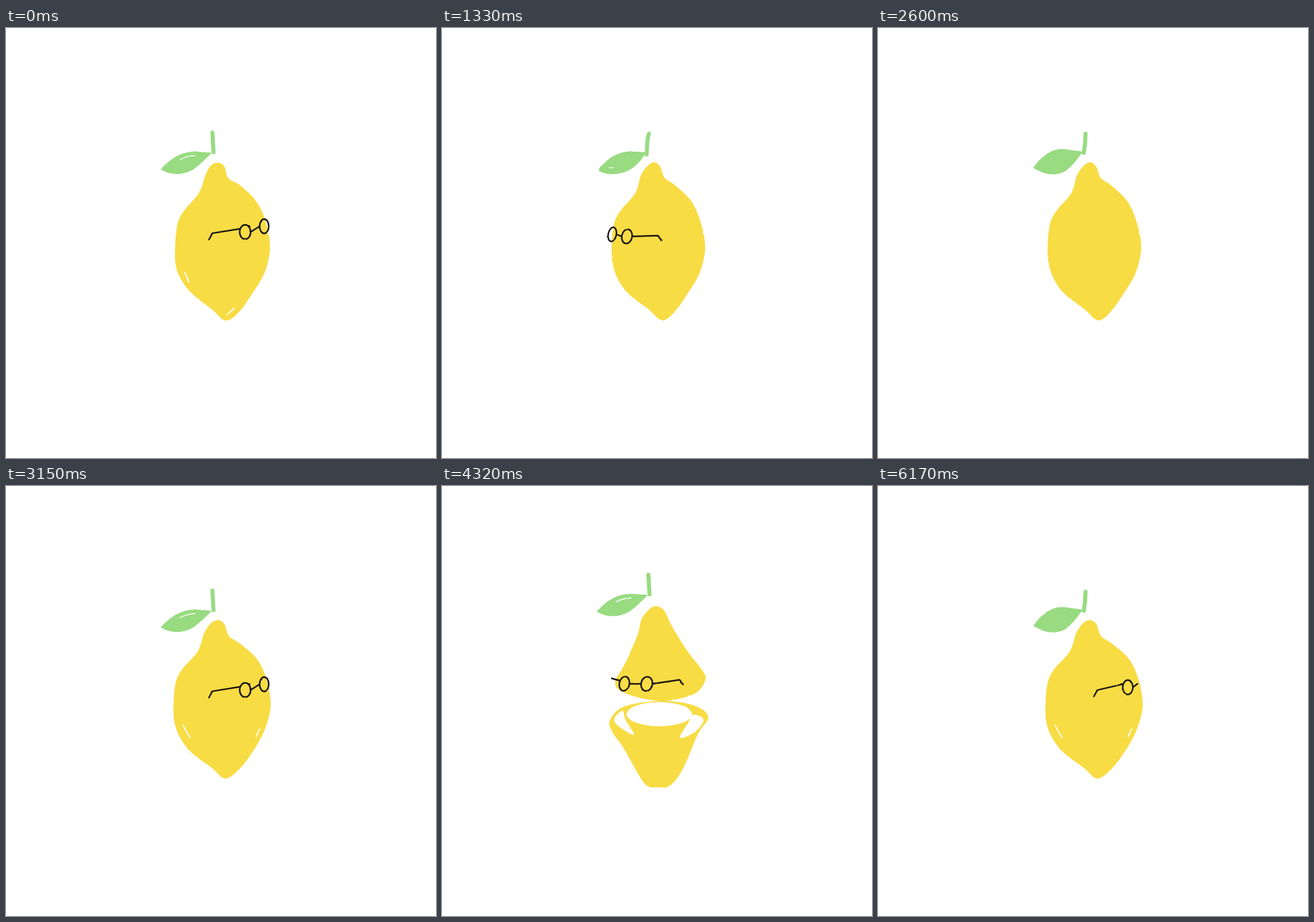
Write an HTML page that moves like this. It is 748x748 px and loops after 6240 ms.

```html
<!DOCTYPE html>
<html lang="en">
<head>
<meta charset="utf-8">
<title>Lemon with glasses</title>
<style>
html, body { margin: 0; width: 100%; height: 100%; overflow: hidden; background: #fff; }
svg { display: block; width: 100%; height: 100%; }
.yellow { fill: #f8dc44; }
.white { fill: #fff; }
.line { fill: none; stroke-linecap: round; stroke-linejoin: round; }
</style>
</head>
<body>
<svg viewBox="0 0 748 748">
  <defs>
    <filter id="rough" filterUnits="userSpaceOnUse" x="0" y="0" width="748" height="748" color-interpolation-filters="sRGB">
      <feTurbulence type="fractalNoise" baseFrequency=".15" numOctaves="2" seed="4" result="noise"/>
      <feDisplacementMap in="SourceGraphic" in2="noise" scale="2" xChannelSelector="R" yChannelSelector="G"/>
    </filter>
  </defs>
  <g filter="url(#rough)">
    <path id="ring" class="line" stroke="#f8dc44" stroke-width="3.5"/>
    <g id="closed">
      <path id="lemon" class="yellow"/>
      <path id="scratch" class="line" stroke="#fff" stroke-width="2"/>
    </g>
    <g id="cup">
      <path id="shell" class="yellow"/>
      <path id="leftHole" class="white"/>
      <path id="rightHole" class="white"/>
      <ellipse class="white" cx="378" cy="397" rx="57" ry="21"/>
    </g>
    <path id="head" class="yellow"/>
    <g id="leaf">
      <path id="blade" fill="#98db81"/>
      <path id="stem" class="line" stroke="#98db81" stroke-width="7"/>
      <path id="nick" class="line" stroke="#fff" stroke-width="1.7"/>
    </g>
    <path id="glasses" class="line" stroke="#1b1710" stroke-width="2.7"/>
  </g>
</svg>
<script>
const LOOP = 6240, TICK = 130, TURN_TICKS = 24;
const OFFSET_AT = 550, OPEN_AT = 3540, CLOSE_AT = 5130;

const part = id => document.getElementById(id);
const set = (id, d) => part(id).setAttribute('d', d);
const move = (id, transform) => part(id).setAttribute('transform', transform);
const show = (id, on) => part(id).setAttribute('display', on ? 'inline' : 'none');
const parse = text => text.split(' ').map(p => p.split(',').map(Number));
const lerp = (a, b, k) => a + (b - a) * k;
const rad = deg => deg * Math.PI / 180;
const stepped = (t, delay) => Math.floor((t - delay) / TICK) * TICK;

// Closed Catmull-Rom curve through the points
function smooth(pts) {
  const at = i => pts[(i + pts.length) % pts.length];
  let d = 'M' + pts[0];
  pts.forEach((b, i) => {
    const [a, c, e] = [at(i - 1), at(i + 1), at(i + 2)];
    const c1 = b.map((v, j) => v + (c[j] - a[j]) / 6);
    const c2 = c.map((v, j) => v - (e[j] - b[j]) / 6);
    d += `C${c1} ${c2} ${c}`;
  });
  return d + 'Z';
}

function random(seed) {
  return () => (seed = seed * 16807 % 2147483647) / 2147483647;
}

// Each redrawing is a little wider, with a slightly unsteady hand
const lemonKeys = parse('371,234 380,242 387,261 406,274 433,299 450,332 458,380 449,425 427,463 404,495 382,508 358,490 320,458 298,420 294,375 302,330 335,288 346,257 357,239');
const lemons = [0, 1, 2].map(i => {
  const next = random(71 + i * 900);
  const shake = () => next() * 2 - 1;
  const width = .985 + .02 * i;
  return smooth(lemonKeys.map(([x, y]) => [376 + (x - 376) * width + shake(), y + shake()]));
});
const scratches = ['', 'M311 425L318 442M384 499L397 487', 'M308 416L320 438M435 436L441 423'];

const leaves = [
  ['M269 246Q297 214 330 215L358 217Q342 234 326 246Q297 262 269 246Z', 'M359 182L361 216', 'M303 229Q315 222 329 222'],
  ['M273 245Q300 212 333 215L355 216Q342 240 320 250Q294 259 273 249Z', 'M360 184Q357 190 356 220', 'M291 243L297 243'],
  ['M270 243Q296 207 326 211L356 215Q341 238 326 249Q300 263 270 243Z', 'M361 184Q361 200 358 217', '']
];

set('head', smooth(parse('367,210 385,215 400,244 426,286 453,321 458,338 438,362 382,374 322,362 301,343 318,310 340,260 348,230')));
set('shell', smooth(parse('292,408 316,384 378,374 436,381 463,401 445,432 420,490 398,520 374,524 352,517 316,456 297,429')));
set('leftHole', smooth(parse('300,404 314,391 319,406 334,433 306,417')));
set('rightHole', smooth(parse('438,398 455,407 440,428 414,438 428,412')));

// Quick rise and slow return while the lemon is open
function liftAt(t) {
  const u = (t - 3445) / 1625;
  return u > 0 && u < 1 ? 31 * Math.sin(Math.PI * u ** .65) : 0;
}
const headLiftAt = t => liftAt(t - 100);

// Facing angle by tick; the back is passed faster than the front
const turn = parse('0,42 4,16 9,-29 10,-55 15,-92 23,-303 24,-318');
const EDGE_LEFT = -72, EDGE_RIGHT = 60;

function facing(tick) {
  const n = tick % TURN_TICKS;
  const i = turn.findIndex(key => key[0] > n);
  const [[n0, a0], [n1, a1]] = [turn[i - 1], turn[i]];
  const angle = lerp(a0, a1, (n - n0) / (n1 - n0));
  return angle < -180 ? angle + 360 : angle;
}

const orbitX = a => 377 + 86 * Math.sin(rad(a));
const orbitY = a => a < -25 ? 363 - .002 * (a + 25) ** 2 : 342 + 21 * Math.cos(rad(a + 25));
const clip = a => Math.min(EDGE_RIGHT, Math.max(EDGE_LEFT, a));

function drawGlasses(tick) {
  const face = facing(tick);
  let d = '';
  const line = pts => d += 'M' + pts.join('L');
  const lenses = [-15, 15].map(off => {
    const a = face + off;
    return { a, x: orbitX(a), y: orbitY(a), rx: 5.5 + 4.5 * Math.cos(rad(a)), shown: a > -74 && a < 66 };
  });

  for (const { a, x, y, rx, shown } of lenses) {
    if (!shown) continue;
    const tilt = a < -5 ? 12 : 0;
    const dx = 12.5 * Math.sin(rad(tilt)), dy = 12.5 * Math.cos(rad(tilt));
    const top = [x + dx, y - dy], bottom = [x - dx, y + dy];
    d += `M${top}A${rx} 12.5 ${tilt} 0 1 ${bottom}A${rx} 12.5 ${tilt} 0 1 ${top}`;
  }

  const joint = (lens, side) => lens.shown
    ? [lens.x + side * lens.rx, lens.y]
    : [orbitX(clip(lens.a)), orbitY(clip(lens.a))];
  const [left, right] = lenses;
  if (left.shown || right.shown) line([joint(left, 1), joint(right, -1)]);

  for (const side of [-1, 1]) {
    const lens = side < 0 ? left : right;
    const raise = side < 0 ? 5.5 : 0;
    const bend = face + side * 54;
    const to = clip(bend);
    const [x, y] = joint(lens, side);
    const end = [orbitX(to), orbitY(to) - raise];
    if ((end[0] - x) * side < 2) continue;
    const pts = [[x, y - raise], end];
    if (to === bend) pts.push([end[0] + side * 6, end[1] + (side < 0 ? 11 : 8)]);
    line(pts);
  }
  set('glasses', d);
  move('glasses', `translate(0 ${-Math.max(0, headLiftAt(tick * TICK) - 11)})`);
}

function drawLemon(t) {
  const open = t >= OPEN_AT && t < CLOSE_AT;
  show('closed', !open);
  show('cup', open);
  show('head', open);
  if (open) {
    const rest = delay => 29.5 - headLiftAt(stepped(t, delay));
    move('head', `translate(0 ${rest(30)})`);
    const stretch = 1 + .0036 * rest(60 - TICK);
    move('cup', `translate(0 ${632 * (1 - stretch)}) scale(1 ${stretch})`);
    return;
  }
  const start = t < OFFSET_AT ? -TICK : t < OPEN_AT ? OFFSET_AT : CLOSE_AT;
  const i = Math.floor((t - start) / TICK) % 3;
  set('lemon', lemons[i]);
  set('scratch', scratches[i]);
}

function drawRing(t) {
  const step = Math.floor((t - CLOSE_AT) / TICK);
  const on = step >= 0 && step < 3;
  show('ring', on);
  if (!on) return;
  const grow = 4 * step * (step + 2);
  const l = 269 - grow, r = 489 + grow;
  set('ring', `M310 379Q${l + 10} 380 ${l} 388Q${l + 10} 394 310 397M440 376Q${r - 12} 378 ${r} 384Q${r - 12} 390 440 397`);
}

function draw(t) {
  const tick = Math.floor(t / TICK);
  ['blade', 'stem', 'nick'].forEach((id, i) => set(id, leaves[tick % 3][i]));
  move('leaf', `translate(0 ${-liftAt(tick * TICK)})`);
  drawGlasses(tick);
  drawLemon(t);
  drawRing(t);
}

const began = performance.now();
function frame() {
  draw((performance.now() - began) % LOOP);
  requestAnimationFrame(frame);
}
frame();
</script>
</body>
</html>
```
